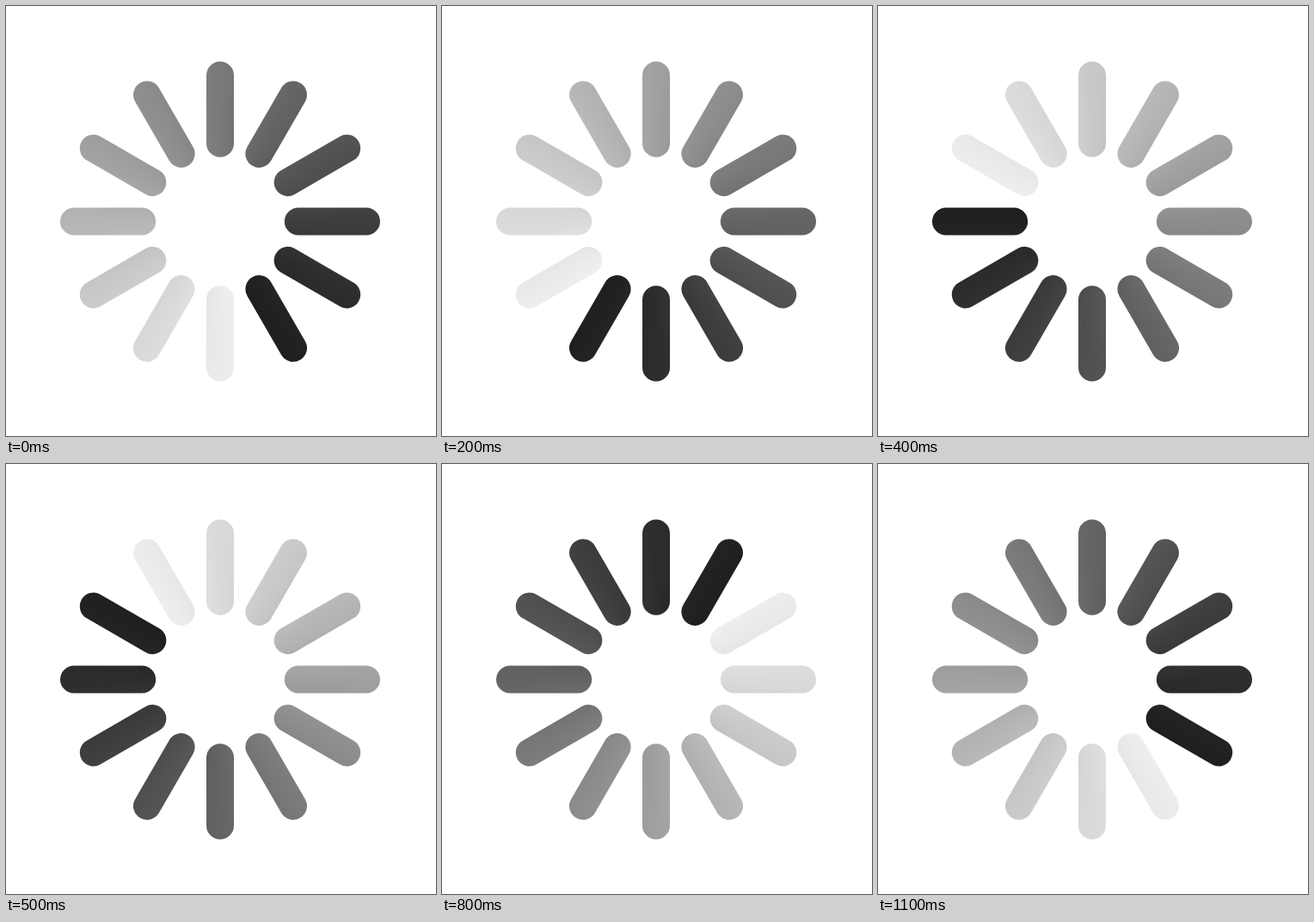
An HTML page with a canvas that plays this animation: 500 by 500 pixels, repeating every 1.2 s.

```html
<!DOCTYPE html>
<html lang="en">
<head>
<meta charset="utf-8">
<title>Loading spinner</title>
<style>
  html, body { margin: 0; width: 100%; height: 100%; overflow: hidden; background: #fff; }
  canvas { display: block; width: 500px; height: 500px; }
</style>
</head>
<body>
<canvas id="stage" width="500" height="500"></canvas>
<script>
const SPOKES = 12;
const STEP_MS = 100;
const STEP_ANGLE = 2 * Math.PI / SPOKES;
const CENTER = { x: 249, y: 250.5 };
const INNER = 90.8, OUTER = 170, WIDTH = 32;

// Grey levels at the spoke centres, clockwise from the lightest spoke.
const GREYS = [235, 218, 201, 181, 160, 141, 121, 100, 82, 62, 45, 33];

const ctx = document.getElementById('stage').getContext('2d');
const grey = level => `rgb(${level}, ${level}, ${level})`;

function sweepGradient() {
  const gradient = ctx.createConicGradient(2.5 * STEP_ANGLE, 0, 0);
  gradient.addColorStop(0, grey(241));
  GREYS.forEach((level, i) => gradient.addColorStop((i + 0.5) / SPOKES, grey(level)));
  gradient.addColorStop(1, grey(29));
  return gradient;
}

const sweep = sweepGradient();

function draw(time) {
  const step = Math.floor(time / STEP_MS) % SPOKES;
  ctx.setTransform(1, 0, 0, 1, 0, 0);
  ctx.fillStyle = '#fff';
  ctx.fillRect(0, 0, 500, 500);

  ctx.translate(CENTER.x, CENTER.y);
  ctx.rotate(step * STEP_ANGLE);
  ctx.strokeStyle = sweep;
  ctx.lineWidth = WIDTH;
  ctx.lineCap = 'round';
  ctx.beginPath();
  for (let i = 0; i < SPOKES; i++) {
    const cos = Math.cos(i * STEP_ANGLE), sin = Math.sin(i * STEP_ANGLE);
    ctx.moveTo(INNER * cos, INNER * sin);
    ctx.lineTo(OUTER * cos, OUTER * sin);
  }
  ctx.stroke();
}

const start = performance.now();
function tick() {
  draw(performance.now() - start);
  requestAnimationFrame(tick);
}
tick();
</script>
</body>
</html>
```
